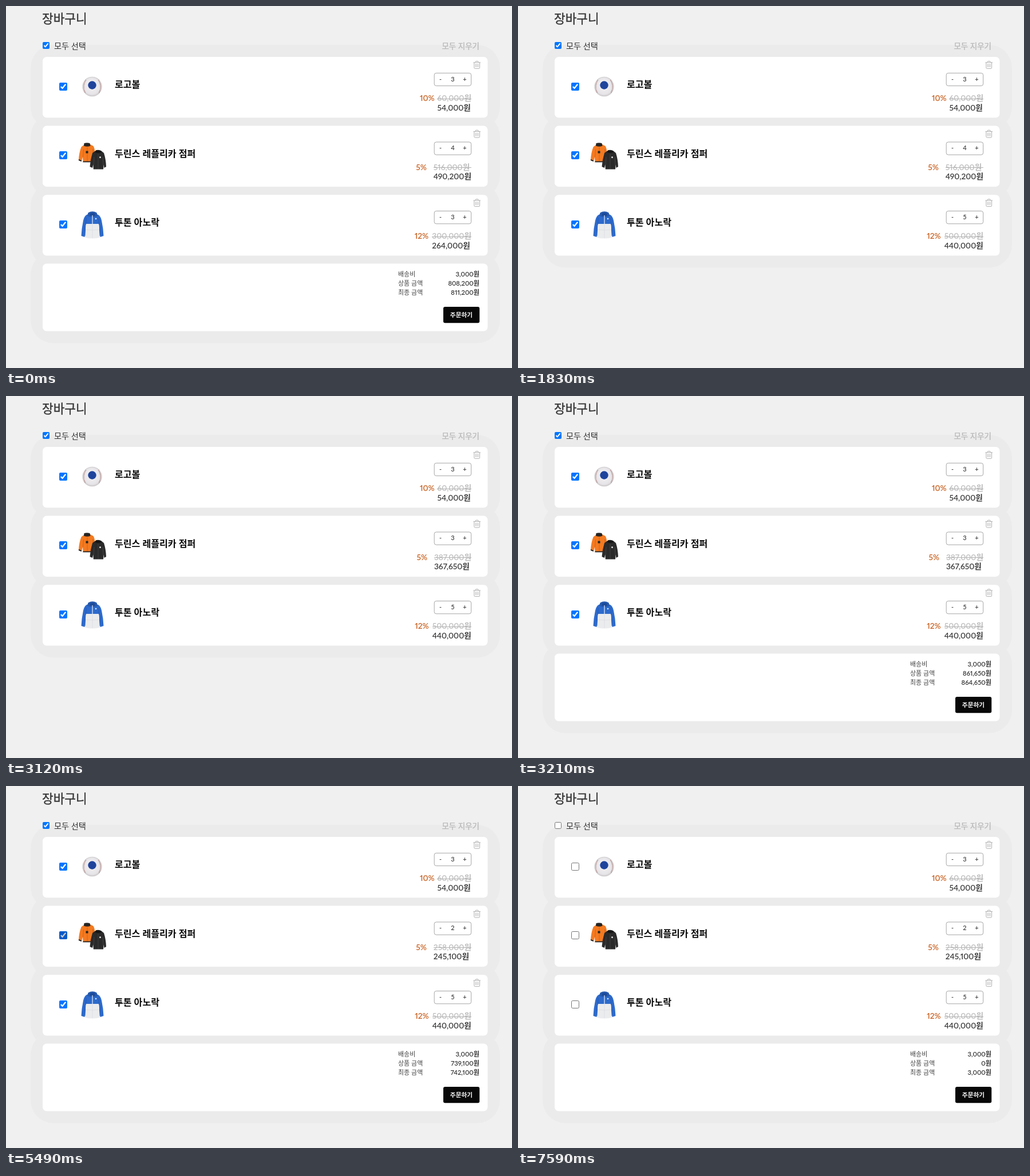
An HTML page with a canvas that plays this animation: 884x633 px, repeating every 8000 ms.

```html
<!DOCTYPE html>
<html lang="ko">
<head>
<meta charset="utf-8">
<title>장바구니</title>
<style>
html, body { margin: 0; width: 100%; height: 100%; overflow: hidden; background: #f0f0f0; }
body { position: relative; font-family: Lato, "Noto Sans CJK KR", "Noto Sans CJK", sans-serif; font-variant-numeric: proportional-nums; }
canvas { position: absolute; left: 0; top: 0; width: 884px; height: 633px; }
input { position: absolute; margin: 0; pointer-events: none; }
input.hover { filter: brightness(.78); }
.t { position: absolute; white-space: pre; line-height: 20px; }
.medium { -webkit-text-stroke: .35px; }
.price { position: absolute; right: calc(100% - 813px); font-size: 13.7px; font-weight: 600; line-height: 16.4px; white-space: pre; color: #3a3a3a; }
.was { position: relative; color: #bdbdbd; }
.was::after { content: ""; position: absolute; left: 0; right: 0; top: 8.5px; height: 1px; background: #b4b4b4; }
.off { position: absolute; left: -30.5px; top: 0; color: #c9601f; }
</style>
</head>
<body>
<canvas id="c"></canvas>
<script>
const W = 884, H = 633, LOOP = 8000, PITCH = 120.6;
const canvas = document.getElementById('c');
const ctx = canvas.getContext('2d');
const dpr = window.devicePixelRatio || 1;
canvas.width = W * dpr;
canvas.height = H * dpr;

const items = [
  { name: '로고볼', unit: 20000, off: 10 },
  { name: '두린스 레플리카 점퍼', unit: 129000, off: 5 },
  { name: '투톤 아노락', unit: 100000, off: 12 }
];
const won = n => n.toLocaleString('en-US') + '원';
const within = (t, a, b) => t >= a && t < b;

// ---- text and controls ----
function add(cls, parent = document.body) {
  const el = document.createElement('div');
  el.className = cls;
  parent.appendChild(el);
  return el;
}

function label(text, x, y, size, weight, color, align = 'left') {
  const el = add('t');
  el.textContent = text;
  el.style.cssText = `left:${x}px;top:${y - 10}px;font-size:${size}px;font-weight:${weight};color:${color}`;
  if (align === 'right') el.style.transform = 'translateX(-100%)';
  if (align === 'center') el.style.transform = 'translateX(-50%)';
  return el;
}

function checkbox(x, y, size) {
  const el = document.createElement('input');
  el.type = 'checkbox';
  el.tabIndex = -1;
  el.style.cssText = `left:${x}px;top:${y}px;width:${size}px;height:${size}px`;
  document.body.appendChild(el);
  return el;
}

function setBox(el, on, hover) {
  el.checked = on;
  el.classList.toggle('hover', hover);
}

function setText(el, text) {
  if (el.textContent !== text) el.textContent = text;
}

label('장바구니', 63, 21.5, 21.4, 400, '#333').classList.add('medium');
const allBox = checkbox(64, 63, 12);
const allText = label('모두 선택', 84, 69.5, 14.2, 400, '#333');
label('모두 지우기', 827, 69.5, 13.5, 400, '#b9b9b9', 'right').classList.add('medium');

const rows = items.map((item, i) => {
  const y = i * PITCH;
  label(item.name, 190, y + 137, 16.1, 600, '#0a0a0a');
  label('-', 759, y + 127.5, 11, 600, '#444', 'center');
  label('+', 801.5, y + 127.5, 11, 600, '#444', 'center');
  const qty = label('', 780.5, y + 127.5, 11, 600, '#444', 'center');
  const price = add('price');
  price.style.top = y + 153.2 + 'px';
  const was = add('was', price), now = add('now', price);
  add('off', price).textContent = item.off + '%';
  return { qty, was, now, box: checkbox(93, Math.round(y + 133.6), 14) };
});

const sumText = [];
const sums = ['배송비', '상품 금액', '최종 금액'].map((name, i) => {
  const y = 469.3 + i * 15.7;
  const value = label('', 827, y, 11.2, 600, '#333', 'right');
  sumText.push(label(name, 685, y, 11, 400, '#444'), value);
  return value;
});
sumText.push(label('주문하기', 795.5, 540, 10.7, 600, '#fff', 'center'));

// ---- shapes ----
function round(x, y, w, h, r, fill, stroke) {
  ctx.beginPath();
  ctx.roundRect(x, y, w, h, r);
  if (fill) { ctx.fillStyle = fill; ctx.fill(); }
  if (stroke) { ctx.strokeStyle = stroke; ctx.lineWidth = 1; ctx.stroke(); }
}

function path(d, fill, stroke, width = 1) {
  const p = new Path2D(d);
  if (fill) { ctx.fillStyle = fill; ctx.fill(p); }
  if (stroke) { ctx.strokeStyle = stroke; ctx.lineWidth = width; ctx.stroke(p); }
}

function dot(x, y, r, fill) {
  ctx.beginPath();
  ctx.arc(x, y, r, 0, 7);
  ctx.fillStyle = fill;
  ctx.fill();
}

function trash(y, hover) {
  const c = hover ? '#555' : '#b0b0b0';
  ctx.save();
  ctx.translate(816, y);
  path('M.5 2.8H13M4.3 2.8V1.4Q4.3.6 5.1.6H8.4Q9.2.6 9.2 1.4V2.8', null, c);
  path('M1.9 2.8V11.7Q1.9 13.4 3.6 13.4H9.9Q11.6 13.4 11.6 11.7V2.8', null, c);
  path('M4.4 5.2V11M6.75 5.2V11M9.1 5.2V11', null, c, .9);
  ctx.restore();
}

function ball() {
  const g = ctx.createRadialGradient(149, 137, 5, 150.5, 141, 17.5);
  g.addColorStop(0, '#f1f0f2');
  g.addColorStop(.75, '#e6e4e7');
  g.addColorStop(1, '#c9c5c7');
  dot(150.5, 141, 17.2, g);
  ctx.setLineDash([1, 1.4]);
  path('M139.5 129.5Q132.5 141 139 152.5M161.5 129.5Q168.5 141 162 152.5', null, '#a8706c', 1.8);
  ctx.setLineDash([]);
  dot(150.5, 138.5, 7.2, '#1f449c');
}

function jackets() {
  path('M136 243L131.5 246.5Q127.5 257 127 269L132 271.5L134 264L134.5 273H153L153.5 264L155.5 258Q155 247 152 244.5L147 242Z', '#f47a20');
  path('M134.5 264L135.5 251M152.5 262L151.5 250M142 247V272', null, '#cf5e12', .8);
  path('M136.5 240Q141.5 238.5 146.5 240L147.5 244.5Q142 247 136 244.5Z', '#242424');
  path('M134.5 271.5H153V273.2H134.5ZM127 268L132 270L131.7 272L126.8 270Z', '#242424');
  ctx.fillStyle = '#242424';
  ctx.fillRect(139.5, 253.5, 4, 4);

  path('M155 254L151 257Q147.5 268 146.5 281L151 283L152.3 277L152.8 285.5H170L170.7 277L171.5 283L175 281Q174.5 268 171 257L166 253Z', '#2b2a2a');
  path('M156 253Q160 250.5 166 253L167 256Q161 258.5 155.5 256Z', '#171717');
  path('M153 278L154 264M170 278L169 264M161 258V285', null, '#484646', .8);
  dot(164.5, 264.5, 1.5, '#dedede');
}

function anorak() {
  path('M142 364.5Q136.5 367 135 375Q132 389 131.5 402L137.5 404L140 384H162L164.5 404L170.5 402Q170 389 167 375Q165.5 367 160 364.5Z', '#2d6acb');
  path('M139.2 381H162.8L163.5 405Q151 408 138.5 405Z', '#ebecee');
  path('M143.5 361.5Q151 357 158.5 361.5L160 367Q151 371 142 367Z', '#2659ae');
  path('M146.5 363Q151 360.5 155.5 363L155 366.5Q151 368.5 147 366.5Z', '#1c4a99');
  path('M139.3 383L140 370M162.7 383L162 370M138.7 383L138 402M163.3 383L164 402', null, '#2153aa', .8);
  path('M151 366V381', null, '#e6eefb', 1.2);
  path('M151 382V406M139 391Q151 393 163 391', null, '#dcdee1', .8);
  dot(157, 372, 1.3, '#e6eefb');
}

function halo(y, h) {
  round(43, y - 21, 820, h + 42, 40, '#ebebeb');
}

// ---- timeline ----
function stateAt(t) {
  const all = t < 6720;
  return {
    qty: [3, t < 3120 ? 4 : t < 4290 ? 3 : 2, t < 1500 ? 3 : t < 1830 ? 4 : 5],
    checked: [all, all && !within(t, 5670, 5940), all],
    loading: within(t, 1500, 1530) || within(t, 1830, 1860) || within(t, 3120, 3150) || within(t, 4290, 4350),
    trashHover: within(t, 4950, 5070),
    boxHover: within(t, 5490, 6210),
    allHover: within(t, 6450, 7560)
  };
}

function draw(s) {
  ctx.setTransform(dpr, 0, 0, dpr, 0, 0);
  ctx.fillStyle = '#f0f0f0';
  ctx.fillRect(0, 0, W, H);
  items.forEach((_, i) => halo(89 + i * PITCH, 106.3));
  if (!s.loading) halo(450.5, 118);

  setBox(allBox, s.checked.every(Boolean), s.allHover);
  allText.style.color = s.allHover ? '#111' : '#333';

  let total = 0;
  items.forEach((item, i) => {
    const y = i * PITCH, n = s.qty[i], row = rows[i];
    const full = item.unit * n, sale = full * (100 - item.off) / 100;
    if (s.checked[i]) total += sale;
    round(64, y + 89, 777.5, 106.3, 7, '#fff');
    round(748.2, y + 117.3, 64.5, 22.3, 3.5, '#fff', '#a5a5a5');
    trash(y + 96, i === 1 && s.trashHover);
    setBox(row.box, s.checked[i], i === 1 && s.boxHover);
    setText(row.qty, String(n));
    setText(row.was, won(full));
    setText(row.now, won(sale));
  });
  ball();
  jackets();
  anorak();

  if (!s.loading) {
    round(64, 450.5, 777.5, 118, 7, '#fff');
    round(764, 526, 63.3, 28.2, 3, '#080808');
  }
  sumText.forEach(el => { el.style.visibility = s.loading ? 'hidden' : 'visible'; });
  [3000, total, total + 3000].forEach((n, i) => setText(sums[i], won(n)));
}

const start = performance.now();
function tick() {
  draw(stateAt((performance.now() - start) % LOOP));
  requestAnimationFrame(tick);
}
tick();
</script>
</body>
</html>
```
